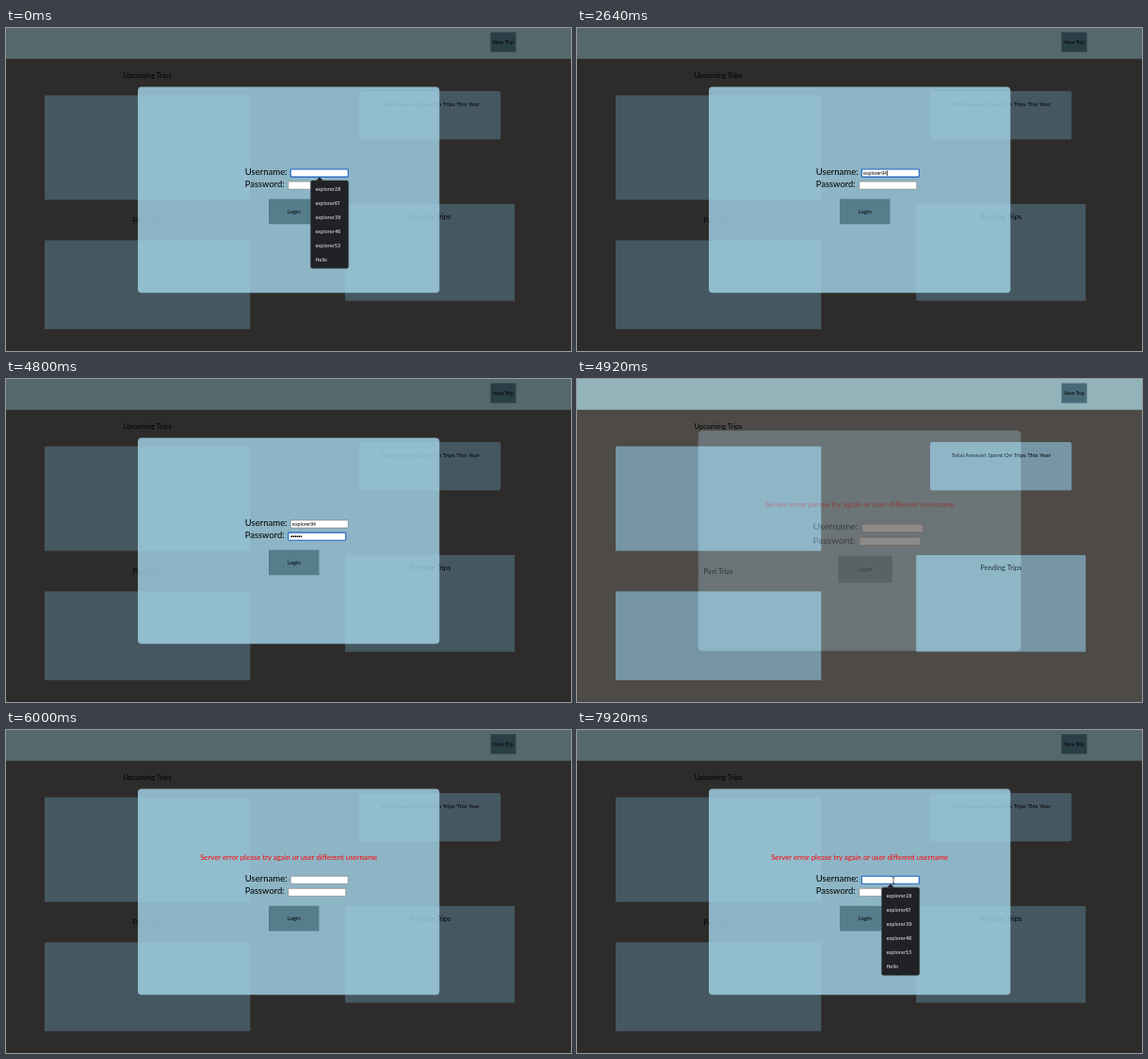
An HTML page that plays this animation: 600x343 px, repeating every 8 s.

```html
<!DOCTYPE html>
<html lang="en">
<head>
<meta charset="utf-8">
<title>Trip planner login</title>
<style>
  html, body { margin: 0; width: 100%; height: 100%; overflow: hidden; background: #5c5854; }
  svg { display: block; width: 100vw; height: 100vh; }
  text { font-family: Lato, sans-serif; fill: #000; }
  .mid { text-anchor: middle; }
  .panel { fill: #8cb2c4; }
  .button { fill: #557d8c; }
  .field { fill: #fff; stroke: #767676; stroke-width: .6; }
  .field.focus { stroke: #1b5fc4; stroke-width: 1.1; }
  .typed { font: 5.3px "Liberation Sans", Arial, sans-serif; }
  .item { font: 5.3px Inter, sans-serif; fill: #f2f2f2; }
  .list { fill: #202225; }
</style>
</head>
<body>
<svg viewBox="0 0 600 343" preserveAspectRatio="none">
  <rect width="600" height="343" fill="#5c5854"/>
  <rect width="600" height="32.7" fill="#acd4db"/>
  <rect class="button" x="514.5" y="4.5" width="27" height="21"/>
  <text class="mid" x="528" y="17" font-size="5.5">New Trip</text>
  <rect class="panel" x="41" y="71.5" width="218.3" height="111"/>
  <rect class="panel" x="41" y="225.5" width="218.3" height="94.3"/>
  <rect class="panel" x="375" y="67" width="150.3" height="51.3" rx="2"/>
  <rect class="panel" x="360.2" y="187" width="180" height="102.7"/>
  <text class="mid" x="150" y="53" font-size="7.55">Upcoming Trips</text>
  <text class="mid" x="150" y="207" font-size="7.45">Past Trips</text>
  <text class="mid" x="450.3" y="82.8" font-size="6.3">Total Amount Spent On Trips This Year</text>
  <text class="mid" x="450.3" y="203" font-size="7.55">Pending Trips</text>

  <g id="overlay">
    <rect width="600" height="343" opacity=".5"/>
    <g id="modal">
      <rect x="140" y="62.5" width="320.3" height="218.7" rx="4" fill="#a3d4e7" fill-opacity=".82"/>
      <text id="error" class="mid" x="300.2" y="138.3" font-size="7.8" style="fill:#f00">Server error please try again or user different username</text>
      <g id="form">
        <text x="253.7" y="156" font-size="9.6">Username:</text>
        <text x="253.7" y="169.2" font-size="9.45">Password:</text>
        <rect id="userBox" class="field" x="302.3" y="150" width="61" height="8.1" rx=".6"/>
        <rect id="passBox" class="field" x="299.8" y="163.1" width="61" height="8.1" rx=".6"/>
        <text id="user" class="typed" x="304" y="156"></text>
        <rect id="caret" y="151.3" width=".6" height="5.6"/>
        <g id="dots"></g>
        <rect class="button" x="279" y="181.5" width="53.5" height="26.8"/>
        <text class="mid" x="305.8" y="196.9" font-size="5.8">Login</text>
        <g id="popup">
          <path class="list" d="M329 162.3l4-4 4 4z"/>
          <rect id="listBox" class="list" x="323.5" y="162" width="40.2" rx="2" stroke="#3c4043" stroke-width=".4"/>
          <g id="items"></g>
        </g>
      </g>
    </g>
  </g>
  <path id="beam" d="M-1.4 -3.6Q0 -3.6 0 -2.6V2.6Q0 3.6 -1.4 3.6M1.4 -3.6Q0 -3.6 0 -2.6M0 2.6Q0 3.6 1.4 3.6" fill="none" stroke="#222" stroke-width=".7"/>
</svg>
<script>
const LOOP = 8000, STEP = 60;
const ERROR_AT = 4920, LIST_AT = 6960;
const LOGIN = 'explorer94';
const NAMES = ['explorer28', 'explorer61', 'explorer39', 'explorer46', 'explorer53', 'Hello'];

const $ = id => document.getElementById(id);
const show = (id, on) => $(id).setAttribute('display', on ? 'inline' : 'none');
const clamp = (v, max = 1) => Math.max(0, Math.min(max, v));
const ease = p => p * p * (3 - 2 * p);

function add(parent, tag, attrs, label = '') {
  const el = document.createElementNS('http://www.w3.org/2000/svg', tag);
  for (const key in attrs) el.setAttribute(key, attrs[key]);
  el.textContent = label;
  return $(parent).appendChild(el);
}

const items = NAMES.map((name, i) =>
  add('items', 'text', { class: 'item', x: 328.4, y: 173 + i * 15.05 }, name));
const dots = Array.from({ length: 6 }, (_, i) =>
  add('dots', 'circle', { cx: 303.2 + i * 2.05, cy: 167.2, r: .85 }));

// Pointer glides from one place to another, then waits until it is hidden.
const MOVES = [
  { from: 2700, to: 3120, until: 3360, a: [352, 154], b: [338, 167] },
  { from: 6060, to: 6660, until: LOOP, a: [348, 182], b: [336, 160] }
];

function drawPointer(t) {
  const m = MOVES.find(m => t >= m.from && t < m.until);
  show('beam', m);
  if (!m) return;
  const p = ease(clamp((t - m.from) / (m.to - m.from)));
  const [x, y] = m.a.map((v, i) => v + (m.b[i] - v) * p);
  $('beam').setAttribute('transform', `translate(${x} ${y})`);
}

function drawOverlay(t) {
  const p = t < ERROR_AT ? 1 : clamp(.3 + (t - ERROR_AT) / STEP * .575);
  const s = 1.1 - .1 * p;
  $('overlay').setAttribute('opacity', p);
  $('modal').setAttribute('transform', `translate(300.15 171.85) scale(${s}) translate(-300.15 -171.85)`);
}

function drawForm(t) {
  const failed = t >= ERROR_AT;
  show('error', failed);
  $('form').setAttribute('transform', `translate(0 ${failed ? 5.2 : 0})`);

  const typed = failed || t < 1740 ? 0 : clamp(Math.floor((t - 1740) / 82) + 1, LOGIN.length);
  $('user').textContent = LOGIN.slice(0, typed);

  const userFocus = t < 3600 || t >= LIST_AT;
  const passFocus = t >= 3600 && !failed;
  $('userBox').classList.toggle('focus', userFocus);
  $('passBox').classList.toggle('focus', passFocus);

  const blink = typed ? t < 3100 : Math.floor(t / 500) % 2 === 1;
  show('caret', userFocus && !failed && blink);
  const end = typed ? $('user').getComputedTextLength() : 0;
  $('caret').setAttribute('x', 304.1 + end);

  const count = failed || t < 3900 ? 0 : Math.floor((t - 3900) / 110) + 1;
  dots.forEach((d, i) => d.setAttribute('display', i < count ? 'inline' : 'none'));

  // Suggestions narrow to the names that begin with the typed text.
  const matches = NAMES.filter(n => n.startsWith(LOGIN.slice(0, typed))).length;
  show('popup', userFocus && matches > 0);
  items.forEach((el, i) => el.setAttribute('display', i < matches ? 'inline' : 'none'));
  $('listBox').setAttribute('height', 2.9 + matches * 15.05);
}

function draw(t) {
  drawOverlay(t);
  drawForm(t);
  drawPointer(t);
}

const start = performance.now();
function tick() {
  const t = (performance.now() - start) % LOOP;
  draw(Math.floor(t / STEP) * STEP);
  requestAnimationFrame(tick);
}
tick();
</script>
</body>
</html>
```
